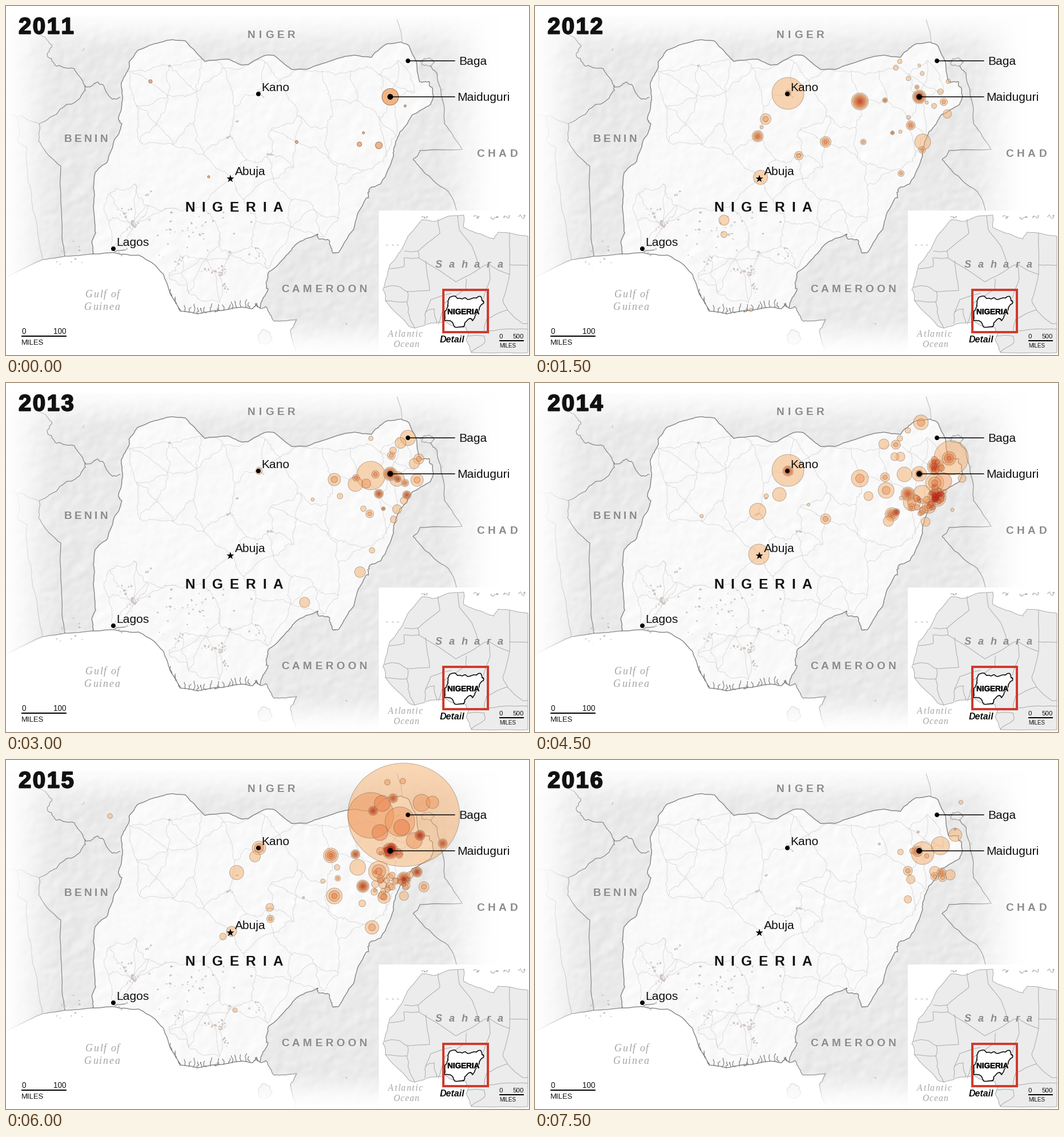
A matplotlib script that plays this animation: 916 px wide and 611 px high, repeating every 9000 ms.

```python
import numpy as np
import matplotlib.pyplot as plt
import matplotlib.patheffects as pe
from matplotlib.animation import ArtistAnimation
from matplotlib.collections import LineCollection, PolyCollection
from matplotlib.patches import Circle, Ellipse, Polygon, Rectangle

W, H, DPI = 916, 611, 100
PT = 72 / DPI
SANS, SERIF = "Liberation Sans", "Liberation Serif"
GREY, MID, PALE_GREY, BLACK = "#858585", "#8b8b8b", "#a4a4a4", "#111111"
rng = np.random.default_rng(11)

fig = plt.figure(figsize=(W / DPI, H / DPI), dpi=DPI, facecolor="white")
ax = fig.add_axes([0, 0, 1, 1])
ax.axis("off")
renderer = fig.canvas.get_renderer()

# ---- borders: a few points each, roughened by rule ----
west = [(152, 434), (151, 410), (156, 395), (153, 350), (153, 318), (156, 292),
        (178, 272), (188, 240), (203, 206), (197, 196), (204, 165), (202, 134),
        (215, 110), (217, 96), (230, 78)]
north = [(230, 78), (260, 66), (292, 59), (314, 61), (348, 97), (390, 93), (412, 103),
         (425, 102), (452, 87), (470, 87), (500, 111), (526, 111), (580, 92), (610, 86),
         (640, 90), (655, 74), (668, 66), (692, 63), (706, 70), (719, 98), (724, 132)]
east = [(724, 132), (742, 133), (747, 145), (744, 172), (712, 190), (690, 220),
        (680, 247), (679, 262), (657, 310), (636, 321), (635, 336), (627, 343),
        (609, 391), (583, 431), (573, 433), (566, 410), (548, 408), (546, 399),
        (515, 412), (495, 433), (461, 465), (456, 487), (459, 495), (445, 529)]
south = [(445, 529), (438, 523), (432, 530), (415, 527), (380, 533), (335, 539),
         (305, 534), (288, 505), (276, 470), (255, 449), (232, 436), (190, 432),
         (152, 434)]
west_coast = [(152, 434), (103, 438), (64, 444), (20, 465), (0, 475)]
east_coast = [(505, 611), (508, 600), (498, 570), (509, 549), (470, 552), (455, 526),
              (445, 529)]
benin = [(200, 160), (186, 163), (170, 138), (160, 133), (150, 140), (138, 139),
         (139, 148), (125, 165), (105, 173), (88, 190), (58, 206), (57, 236), (75, 262),
         (96, 280), (98, 405), (103, 438)]
togo = [(18, 195), (20, 235), (37, 248), (38, 300), (50, 365), (64, 444)]
sahel = [(58, 206), (28, 193), (0, 189)]
niger = [(34, 20), (58, 50), (80, 68), (72, 84), (88, 105), (120, 110), (138, 139)]
chad = [(743, 105), (755, 118), (766, 170), (768, 206), (799, 251), (725, 253),
        (713, 269), (735, 294), (775, 325), (789, 358)]
spur = [(685, 24), (692, 46), (694, 63)]


def rough(pts, amp=1.2, steps=3):
    p = np.array(pts, float)
    for _ in range(steps):
        out = np.empty((2 * len(p) - 1, 2))
        out[::2] = p
        out[1::2] = (p[:-1] + p[1:]) / 2 + rng.normal(0, amp, (len(p) - 1, 2))
        p, amp = out, amp * 0.6
    return p


def ring(x, y, rx, ry, n=10):
    a = np.linspace(0, 2 * np.pi, n)
    return np.c_[x + rx * np.cos(a), y + ry * np.sin(a)]


def lines(paths, color, px, z):
    ax.add_collection(LineCollection(paths, colors=color, linewidths=px * PT, zorder=z,
                                     capstyle="round", joinstyle="round"))


def shape(pts, fill, edge="none", px=0, z=1):
    return ax.add_patch(Polygon(pts, closed=True, fc=fill, ec=edge, lw=px * PT, zorder=z))


def picture(data, z):
    return ax.imshow(data, extent=(0, W, H, 0), zorder=z, aspect="auto",
                     interpolation="nearest")


def hillshade():
    fx, fy = np.meshgrid(np.fft.fftfreq(W), np.fft.fftfreq(H))
    f = np.hypot(fx, fy)
    gain = np.exp(-(f * 14) ** 2) / (f + 0.012) ** 1.3
    ground = np.fft.ifft2(np.fft.fft2(rng.normal(size=(H, W))) * gain).real
    gy, gx = np.gradient(ground)
    return (gx + gy) / (gx + gy).std()


def shaded(level, depth):
    tone = np.clip(level + depth * relief, 0, 255).astype(np.uint8)
    return np.repeat(tone[..., None], 3, axis=2)


def ramp(v, a, b):
    t = np.clip((v - a) / (b - a), 0, 1)
    return t * t * (3 - 2 * t)


relief = hillshade()
picture(shaded(234, 2.2), 1)
nigeria = np.vstack([rough(west), rough(north, 0.6), rough(east, 1.5), rough(south, 0.8)])
coast_w, coast_e = rough(west_coast, 0.5), rough(east_coast, 1.3)
shape(np.vstack([coast_e, south[1:], coast_w, [(0, H)]]), "white", z=2)
lines([rough(benin), rough(niger, 2), rough(chad), coast_w, coast_e], GREY, 1.2, 2.2)
lines([rough(togo, 1.8), rough(sahel)], "#aaaaaa", 1, 2.2)
shape(rough(ring(453, 580, 12, 13), 1, 2), "#f3f3f3", "#bdbdbd", 1, 2.2)

# the edges of the map dissolve into white
yy, xx = np.mgrid[0:H, 0:W]
keep = (ramp(xx, -15, 105) * (1 - ramp(xx, 742, 862)) * (1 - ramp(yy, 535, 612))
        * np.where(yy < 18, 0, 0.08 + 0.92 * ramp(yy, 10, 88)))
veil = np.ones((H, W, 4))
veil[..., 3] = 1 - keep
picture(veil, 2.5)

body = shape(nigeria, "#f9f9f9", z=3)
picture(shaded(249.5, 1.3), 3.1).set_clip_path(body)
lines([nigeria], GREY, 1.4, 4)
lines([spur], "#b5b5b5", 0.9, 4)
lines([rough(ring(738, 98, 11, 7), 1.3, 2), [(719, 95), (727, 98)]], "#999999", 1, 4)

# roads join each town to its nearest neighbours
towns = [(442, 154), (393, 229), (393, 302), (462, 260), (509, 238), (569, 167),
         (673, 159), (613, 165), (653, 194), (287, 104), (222, 382), (188, 425),
         (305, 437), (392, 435)]
for spot in rng.uniform((160, 70), (740, 520), (400, 2)):
    clear = min(np.hypot(*(np.array(towns) - spot).T)) > 40
    if clear and body.get_path().contains_point(spot):
        towns.append(tuple(spot))
pts = np.array(towns)
links = set()
for i, p in enumerate(pts):
    for j in np.argsort(np.hypot(*(pts - p).T))[1:4]:
        links.add((min(i, int(j)), max(i, int(j))))
lines([rough(pts[[i, j]], 4.5, 4) for i, j in sorted(links)], "#d9d9d9", 0.9, 3.3)

# built-up areas: x, y, spread, count
urban = [(222, 382, 6, 16), (250, 329, 3, 5), (205, 358, 10, 8), (393, 229, 3, 6),
         (305, 447, 5, 10), (370, 465, 9, 24), (345, 383, 9, 6), (392, 434, 3, 5),
         (391, 494, 5, 8), (436, 435, 9, 9), (463, 260, 2, 4), (287, 104, 2, 3),
         (404, 202, 2, 3), (136, 77, 2, 3), (593, 556, 2, 3), (505, 549, 3, 4),
         (765, 147, 2, 4), (446, 155, 3, 5), (200, 428, 6, 7), (110, 433, 18, 14),
         (330, 400, 50, 36)]
blobs = []
for x, y, spread, count in urban:
    for cx, cy in rng.normal((x, y), (spread, min(spread * 0.7, 28)), (count, 2)):
        r = rng.uniform(0.5, 2.3) * rng.uniform(0.5, 1.4, (7, 1))
        blobs.append((cx, cy) + r * ring(0, 0, 1, 1, 7))
ax.add_collection(PolyCollection(blobs, facecolors="#cdc0bc", edgecolors="none", zorder=3.4))

# delta creeks
shore = np.array(sorted(south[:8]))
creeks = [rough([(190, 430), (200, 428), (210, 427)], 0.6, 2)]
for x in np.linspace(290, 442, 21):
    y = np.interp(x, *shore.T)
    creeks.append(rough([(x, y), (x + rng.uniform(-4, 4), y - rng.uniform(5, 17))], 1.6))
lines(creeks, "#777777", 1.1, 4)


# ---- lettering ----
def label(s, x, y, px, color=BLACK, **font):
    font.setdefault("family", SANS)
    return ax.text(x, y, s, fontsize=px * PT, color=color, zorder=12, **font)


def width(s, px, **font):
    t = label(s, 0, 0, px, **font)
    w = t.get_window_extent(renderer).width
    t.remove()
    return w


def tracked(s, x, y, px, gap, color=BLACK, effects=None, **font):
    out, base = [], width("HH", px, **font)
    for c in s:
        out.append(label(c, x, y, px, color, **font))
        out[-1].set_path_effects(effects or [])
        x += width(f"H{c}H", px, **font) - base + gap
    return out


bold = dict(weight="bold")
soft = dict(family=SERIF, style="italic", color=PALE_GREY)
for name, x, y, gap in [("NIGER", 423, 56, 6), ("BENIN", 102, 238, 4.4),
                        ("CHAD", 824, 264, 5.8), ("CAMEROON", 482, 501, 5.4)]:
    tracked(name, x, y, 19, gap, MID, **bold)
tracked("NIGERIA", 313, 360, 24.5, 11.7, **bold)
tracked("Gulf of", 139, 510, 18, 1.5, **soft)
tracked("Guinea", 137, 532, 18, 1.8, **soft)

for name, x, y in [("Kano", 447, 149), ("Baga", 793, 103), ("Maiduguri", 790, 166),
                   ("Abuja", 401, 296), ("Lagos", 193, 420)]:
    label(name, x, y, 21)
for x, y, r in [(442, 154, 4), (673, 159, 5), (704, 96, 4), (188, 425, 4)]:
    ax.add_patch(Circle((x, y), r, fc="black", ec="none", zorder=11))
lines([[(704, 96), (786, 96)], [(673, 159), (786, 159)]], "black", 1.5, 11)
turn = -np.pi / 2 + np.arange(10) * np.pi / 5
reach = np.where(np.arange(10) % 2, 2.7, 7)
shape(np.c_[393 + reach * np.cos(turn), 302.5 + reach * np.sin(turn)], "black", z=11)


def scale(x0, x1, y, px, top, far):
    ax.add_patch(Rectangle((x0, y - 1), x1 - x0, 2, fc="black", ec="none", zorder=12))
    label("0", x0, y - 4, top)
    label(far, x1, y - 4, top, ha="right")
    label("MILES", x0, y + px + 2, px)


scale(27, 106, 578, 13, 13.5, "100")

# ---- locator map ----
ax.add_patch(Rectangle((653, 358), W - 653, H - 358, fc="white", ec="none", zorder=6))
africa = [(914, 403), (862, 396), (854, 408), (825, 398), (802, 388), (802, 366),
          (775, 368), (746, 377), (729, 374), (705, 402), (692, 428), (672, 453),
          (660, 497), (665, 516), (705, 560), (716, 564), (745, 555), (769, 551),
          (787, 561), (806, 563), (811, 573), (806, 585), (815, 607), (914, 607)]
north_lines = [
    [(698, 429), (722, 429), (760, 398), (757, 373)],
    [(722, 429), (723, 441), (697, 441), (697, 456), (672, 460)],
    [(723, 441), (788, 483), (830, 459), (845, 452), (882, 470), (882, 398)],
    [(791, 367), (794, 392), (816, 420), (830, 459)],
    [(882, 453), (914, 454)],
    [(735, 446), (742, 498), (703, 500), (688, 491), (663, 493)],
]
south_lines = [
    [(845, 452), (848, 478), (836, 512)],
    [(882, 470), (870, 515), (878, 532), (842, 548), (838, 570), (870, 566), (914, 566)],
    [(806, 478), (806, 495), (768, 520), (757, 557)],
    [(780, 503), (744, 514), (735, 536), (733, 556)],
    [(703, 500), (702, 518), (664, 516)],
    [(702, 518), (704, 536), (716, 564)],
    [(735, 536), (750, 530), (754, 556)],
    [(878, 532), (905, 556), (914, 556)],
    [(808, 578), (838, 578), (838, 590), (815, 606)],
]
shape(rough(africa, 1, 3), "#ececed", PALE_GREY, 0.9, 6.1)
lines([rough(p, 0.9, 2) for p in north_lines + south_lines], PALE_GREY, 0.9, 6.2)
isles = [rough([(x, 369), (x + 6, 371), (x + 9, 368)], 2) for x in (728, 820, 850, 872, 898)]
isles += [[(x, 418), (x + 3, 419)] for x in (666, 676, 685)]
lines(isles, "#adadad", 1, 6.2)
shape(nigeria * 0.1145 + (751, 501), "white", "black", 1.5, 7)
ax.add_patch(Rectangle((765.5, 497), 78, 73.5, fc="none", ec="#cf3b2c", lw=4 * PT, zorder=8))
halo = [pe.withStroke(linewidth=2.5 * PT, foreground="white"),
        pe.withStroke(linewidth=0.4 * PT, foreground=BLACK)]
label("NIGERIA", 773, 539.5, 13.5, **bold).set_path_effects(halo)
label("Detail", 760, 589, 16, style="italic", **bold)
tracked("Sahara", 752, 458, 18, 11.7, MID, style="italic", **bold)
tracked("Atlantic", 669, 579, 15.5, 1.6, **soft)
tracked("Ocean", 678, 597, 15.5, 1.2, **soft)
scale(864, 907, 586, 9.8, 11.5, "500")

# ---- incidents: x, y, radius and optional number of nested rings ----
in_2011 = [(673, 159, 14.5), (253, 132, 3), (699, 175, 2), (626, 222, 2), (619, 242, 4),
           (653, 244, 6), (509, 238, 2.5), (355, 299, 2)] * 2
in_2012 = [(443, 153, 28), (443, 153, 5, 3), (404, 198, 9.5, 2), (397, 212, 3),
           (390, 228, 10, 4), (395, 300, 12.5), (331, 375, 9), (331, 400, 5.5),
           (462, 262, 7.5, 2), (509, 238, 9.5, 3), (569, 167, 15, 6), (613, 165, 4.5, 3),
           (575, 238, 5, 2), (641, 293, 5.5, 2), (632, 108, 4.5), (639, 97, 4),
           (673, 104, 2.5), (678, 118, 3.5), (654, 127, 4), (669, 142, 4, 2), (724, 132, 4),
           (710, 150, 5), (716, 168, 6.5, 2), (722, 189, 7.5), (699, 175, 4.5),
           (686, 169, 3), (654, 195, 3.5), (658, 209, 8, 3), (626, 222, 3.5, 3),
           (640, 220, 3), (679, 238, 14), (678, 252, 6, 2), (673, 159, 12, 6), (378, 532, 3)]
in_2013 = [(639, 162, 25), (612, 177, 13), (613, 166, 6, 2), (631, 176, 8), (647, 160, 6.5, 2),
           (673, 159, 12, 6), (685, 168, 13), (686, 168, 6, 4), (699, 175, 6.5, 3),
           (720, 170, 11, 2), (704, 96, 13.5), (691, 105, 9.5), (678, 118, 6),
           (675, 127, 7, 2), (639, 97, 4), (723, 133, 9, 2), (715, 141, 9), (653, 194, 8, 5),
           (702, 196, 7.5, 5), (697, 206, 6.5), (685, 221, 8), (679, 239, 6),
           (661, 220, 3.5, 3), (637, 229, 7, 2), (626, 220, 5), (575, 169, 11, 2),
           (585, 198, 5), (537, 204, 3), (641, 293, 5), (620, 331, 9.5), (523, 384, 9),
           (443, 154, 6, 2)]
in_2014 = [(443, 153, 28), (443, 154, 9, 4), (428, 195, 12), (405, 198, 4),
           (390, 225, 14.5), (392, 300, 18), (292, 233, 3), (479, 213, 2.5),
           (509, 238, 9, 2), (569, 167, 15, 2), (584, 198, 8), (613, 165, 8, 2),
           (615, 188, 14, 2), (611, 107, 9), (632, 108, 8, 2), (639, 97, 5), (653, 83, 5),
           (630, 129, 7), (640, 129, 8), (676, 69, 13, 2), (729, 131, 30),
           (725, 132, 12, 3), (701, 146, 14, 5), (647, 160, 13), (673, 159, 13, 2),
           (700, 175, 16, 3), (748, 167, 7), (715, 172, 15), (653, 194, 12, 5),
           (660, 209, 15, 2), (678, 195, 16), (704, 200, 16, 5), (690, 216, 12, 3),
           (625, 230, 12, 4), (633, 226, 6, 4), (619, 242, 9), (684, 243, 8), (731, 222, 3)]
in_2015 = [(182, 98, 4.5), (443, 154, 12, 3), (436, 169, 9.5), (404, 197, 12.5),
           (462, 258, 7), (463, 278, 6.5, 2), (395, 300, 9), (380, 309, 6), (401, 438, 4),
           (521, 241, 2), (575, 238, 14, 3), (569, 167, 13, 4), (580, 188, 5),
           (581, 207, 5, 2), (555, 212, 4), (612, 165, 8, 5), (616, 188, 14),
           (625, 221, 11, 6), (624, 251, 6), (641, 293, 12, 2), (696.5, 96, 98),
           (639, 97, 40), (668, 39, 5), (695, 37, 5), (678, 67, 8, 4), (659, 76, 14),
           (728, 75, 15), (747, 74, 11), (643, 89, 8, 4), (690, 108, 26), (655, 127, 14),
           (693, 118, 14), (725, 132, 9, 5), (765, 146, 8, 4), (715, 141, 14),
           (673, 159, 14, 7), (653, 195, 18, 3), (697, 208, 12, 6), (720, 196, 9, 6),
           (732, 222, 9, 2), (697, 238, 8), (662, 240, 11, 2)]
in_2016 = [(679, 163, 20), (670, 160, 9, 3), (661, 159, 5), (710, 150, 16), (736, 131, 11.5),
           (746, 74, 3.5), (736, 121, 2), (671, 126, 2), (603, 147, 2), (640, 161, 5),
           (653, 194, 8, 2), (658, 209, 7.5), (653, 244, 6.5), (686, 168, 4), (700, 195, 9),
           (712, 197, 8, 3), (714, 206, 7, 2), (727, 201, 9), (700, 204, 7, 2)]


def cluster(x, y, sx, sy, count):
    spots = rng.normal((x, y), (sx, sy), (count, 2))
    return [(*p, r) for p, r in zip(spots, rng.uniform(2.5, 7, count))]


in_2014 += cluster(703, 199, 8, 6, 20) + cluster(668, 214, 11, 9, 16)
in_2014 += cluster(703, 143, 5, 9, 8)
in_2015 += cluster(668, 160, 11, 7, 12) + cluster(692, 210, 10, 8, 12)
in_2015 += cluster(656, 222, 15, 10, 14)
COOL, HOT = np.array([245, 174, 106]) / 255, np.array([214, 32, 18]) / 255


def bubbles(spots):
    rings = []
    for x, y, r, *n in spots:
        n = n[0] if n else 1
        rings += [(x, y, r * (1 - k / n)) for k in range(n)]
    rings.sort(key=lambda c: -c[2])
    out = []
    for i, (x, y, r) in enumerate(rings):
        # the more circles lie beneath, the redder the tone
        depth = sum(np.hypot(x - a, y - b) < c for a, b, c in rings[:i])
        tone = COOL + (HOT - COOL) * min(depth / 6, 1)
        height = 2 * min(r, 90.5)
        out.append(ax.add_patch(Ellipse((x, y), 2 * r, height, fc=(*tone, 0.5),
                                        ec=(0.35, 0.25, 0.2, 0.5), lw=0.7 * PT, zorder=9)))
    return out


heavy = [pe.withStroke(linewidth=2 * PT, foreground=BLACK)]
scenes = [bubbles(spots) + tracked(str(2011 + i), 22, 48.5, 40, 2.6, effects=heavy, **bold)
          for i, spots in enumerate([in_2011, in_2012, in_2013, in_2014, in_2015, in_2016])]

ax.set_xlim(0, W)
ax.set_ylim(H, 0)
anim = ArtistAnimation(fig, scenes, interval=1500, repeat=True, repeat_delay=0, blit=False)
plt.show()
```
